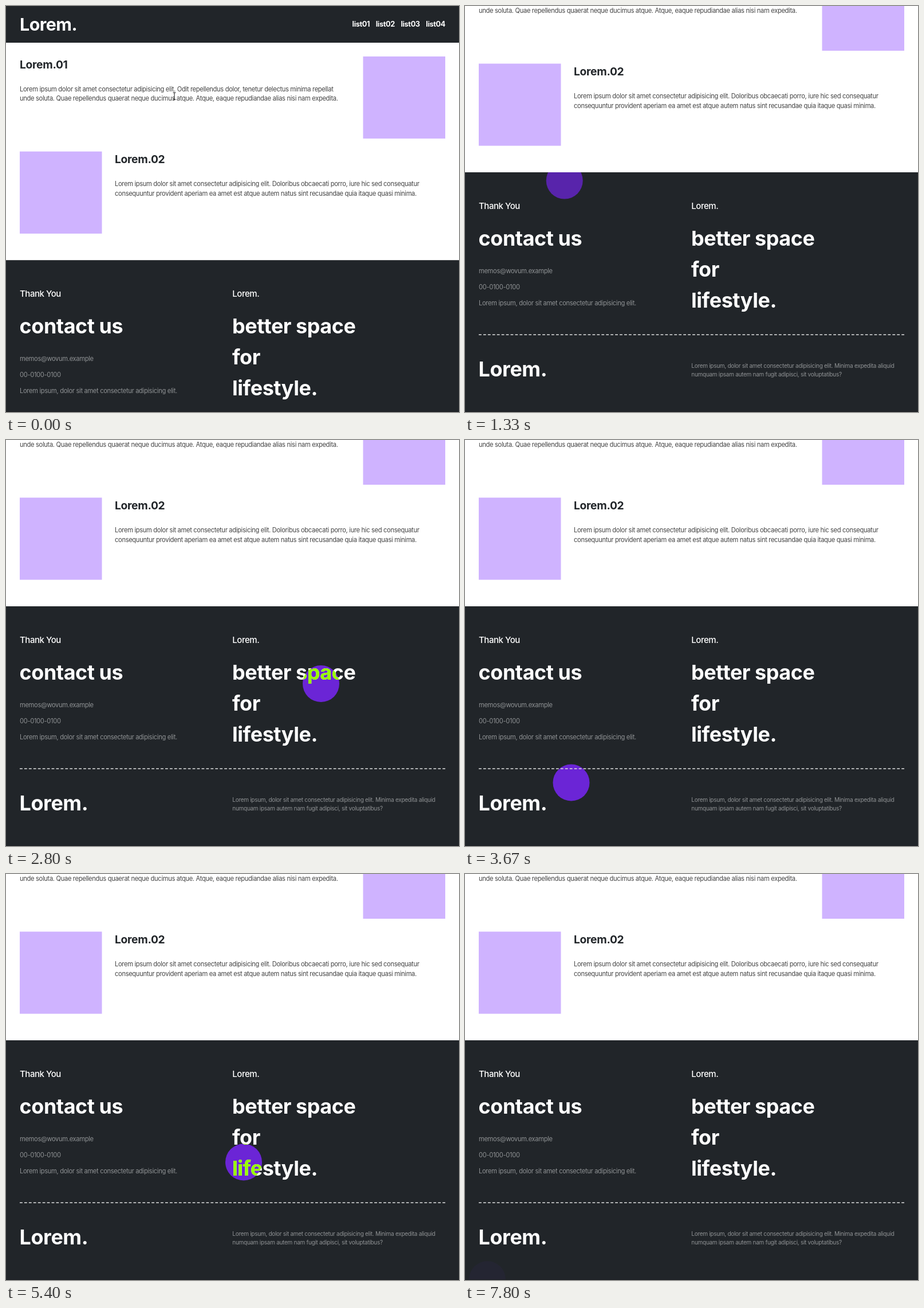
Write an HTML page that moves like this. It is 791 by 708 pixels and loops after 8070 ms.

```html
<!DOCTYPE html>
<html lang="en">
<head>
<meta charset="utf-8">
<title>Lorem.</title>
<style>
  html, body { margin: 0; width: 100%; height: 100%; overflow: hidden; background: #fff; }
  svg { display: block; width: 791px; height: 708px; }
  text { font-family: Inter, "Open Sans", sans-serif; font-optical-sizing: none; letter-spacing: -.03em; }
  .logo, .nav, .title, .big { font-weight: 700; }
  .logo { font-size: 30.3px; letter-spacing: -.5px; fill: #fff; }
  .nav { font-size: 12.75px; word-spacing: 8px; text-anchor: end; fill: #fff; }
  .title { font-size: 19.2px; letter-spacing: -.3px; fill: #212529; }
  .body, .info { font-size: 11.16px; }
  .body { fill: #444; }
  .label { font-size: 15px; font-weight: 500; }
  .big { font-size: 35.9px; letter-spacing: -.42px; }
  .note { font-size: 10.04px; }
  .info, .note { fill: #8f9294; }
</style>
</head>
<body>
<svg viewBox="0 0 791 708">
  <defs>
    <clipPath id="footClip"><rect y="443.2" width="791" height="420"/></clipPath>
    <clipPath id="spotClip"><circle id="hole" r="32"/></clipPath>
  </defs>
  <g id="page">
    <rect width="791" height="64" fill="#212529"/>
    <text class="logo" x="24" y="42.6">Lorem.</text>
    <text class="nav" x="767" y="36">list01 list02 list03 list04</text>

    <rect x="623.5" y="88" width="143.5" height="143.2" fill="#cfb3ff"/>
    <text class="title" x="24" y="108.5">Lorem.01</text>
    <text class="body" y="148.6">
      <tspan x="24">Lorem ipsum dolor sit amet consectetur adipisicing elit. Odit repellendus dolor, tenetur delectus minima repellat</tspan>
      <tspan x="24" dy="1.5em">unde soluta. Quae repellendus quaerat neque ducimus atque. Atque, eaque repudiandae alias nisi nam expedita.</tspan>
    </text>

    <rect x="24" y="253.7" width="143.5" height="143.2" fill="#cfb3ff"/>
    <text class="title" x="190" y="274.3">Lorem.02</text>
    <text class="body" y="314.4">
      <tspan x="190">Lorem ipsum dolor sit amet consectetur adipisicing elit. Doloribus obcaecati porro, iure hic sed consequatur</tspan>
      <tspan x="190" dy="1.5em">consequuntur provident aperiam ea amet est atque autem natus sint recusandae quia itaque quasi minima.</tspan>
    </text>

    <rect y="443.2" width="791" height="420" fill="#212529"/>
    <g clip-path="url(#footClip)"><circle id="spot" r="32" fill="#6b25d6"/></g>
    <g fill="#fff">
      <g id="headings">
        <text class="label" x="24" y="507.3">Thank You</text>
        <text class="label" x="395.3" y="507.3">Lorem.</text>
        <text class="big" x="23.6" y="571">contact us</text>
        <text class="big" y="571">
          <tspan x="395">better space</tspan>
          <tspan x="395" dy="1.507em">for</tspan>
          <tspan x="395" dy="1.507em">lifestyle.</tspan>
        </text>
        <text class="big" x="23.6" y="799.7">Lorem.</text>
      </g>
    </g>
    <text class="info" y="619">
      <tspan x="24">memos@wovum.example</tspan>
      <tspan x="24" dy="28">00-0100-0100</tspan>
      <tspan x="24" dy="28">Lorem ipsum, dolor sit amet consectetur adipisicing elit.</tspan>
    </text>
    <path d="M24 726.4H767" stroke="#dedfdf" stroke-width="1.6" stroke-dasharray="4.8 3.138"/>
    <text class="note" y="784.2">
      <tspan x="395.3">Lorem ipsum, dolor sit amet consectetur adipisicing elit. Minima expedita aliquid</tspan>
      <tspan x="395.3" dy="1.5em">numquam ipsam autem nam fugit adipisci, sit voluptatibus?</tspan>
    </text>
    <g id="lit" fill="#98ff00" clip-path="url(#spotClip)"><use href="#headings"/></g>
  </g>
  <rect y="707" width="791" height="1" fill="#1b1e21"/>
  <g id="cursor">
    <path id="beam" d="M-2.5 -6H2.5M0 -6V6M-2.5 6H2.5" fill="none" stroke="#111"/>
    <path id="arrow" d="M0 0V13L3 10.3L5.2 14.8L7.2 13.9L5.1 9.5H9.2Z" fill="#fff" stroke="#111" stroke-width=".9"/>
  </g>
</svg>
<script>
  const LOOP = 8070, STEP = 200 / 3, LAST = 117, SCROLL = 153.2;
  const $ = id => document.getElementById(id);
  const [page, spot, hole, lit, cursor, beam, arrow] =
    ['page', 'spot', 'hole', 'lit', 'cursor', 'beam', 'arrow'].map($);

  // Turning points of the pointer over the footer: time, x, y
  const turns = [
    [1130, 222, 286], [1730, 41, 376], [1930, 64, 395.5], [2800, 550, 425], [3670, 184, 598],
    [4000, 28, 636], [5400, 415, 502.5], [6200, 400, 352], [6670, 188, 402.5], [7470, 39, 707]
  ];

  const ramp = (t, from, to) => Math.max(0, Math.min(1, (t - from) / (to - from)));
  const ease = (t, from, to) => {
    const u = ramp(t, from, to);
    return u * u * (3 - 2 * u);
  };

  // Smooth curve through the turns that never overshoots them
  function slope(i, c) {
    if (!i || i === turns.length - 1) return 0;
    const [a, b, d] = turns.slice(i - 1, i + 2);
    const s = (b[c] - a[c]) / (b[0] - a[0]), e = (d[c] - b[c]) / (d[0] - b[0]);
    return s * e <= 0 ? 0 : 2 * s * e / (s + e);
  }
  function follow(t, c) {
    const next = turns.findIndex(k => k[0] > t);
    if (next < 1) return turns.at(next)[c];
    const i = next - 1, a = turns[i], b = turns[next];
    const h = b[0] - a[0], u = (t - a[0]) / h, v = 1 - u;
    return a[c] + (b[c] - a[c]) * u * u * (3 - 2 * u)
      + h * u * v * (slope(i, c) * v - slope(next, c) * u);
  }

  function draw(t) {
    const time = Math.min(LAST, Math.floor((t + 5.5) / STEP)) * STEP;
    const scroll = SCROLL * ease(time, 330, 1084);
    const fade = ramp(time, 1130, 1400) * (1 - .95 * ramp(time, 7470, 7800));
    const move = ease(time, 0, 800);

    page.setAttribute('transform', `translate(0 ${-scroll})`);
    for (const c of [spot, hole]) {
      c.setAttribute('cx', follow(time, 1));
      c.setAttribute('cy', follow(time, 2) + scroll);
    }
    for (const el of [spot, lit]) el.setAttribute('opacity', fade);
    cursor.setAttribute('transform', `translate(${294 - 43 * move} ${157 + 74 * move})`);
    cursor.setAttribute('opacity', time < 1130 ? 1 : 0);
    beam.setAttribute('opacity', move < .2 ? 1 : 0);
    arrow.setAttribute('opacity', move < .2 ? 0 : 1);
  }

  const start = performance.now();
  function tick() {
    draw((performance.now() - start) % LOOP);
    requestAnimationFrame(tick);
  }
  tick();
</script>
</body>
</html>
```
